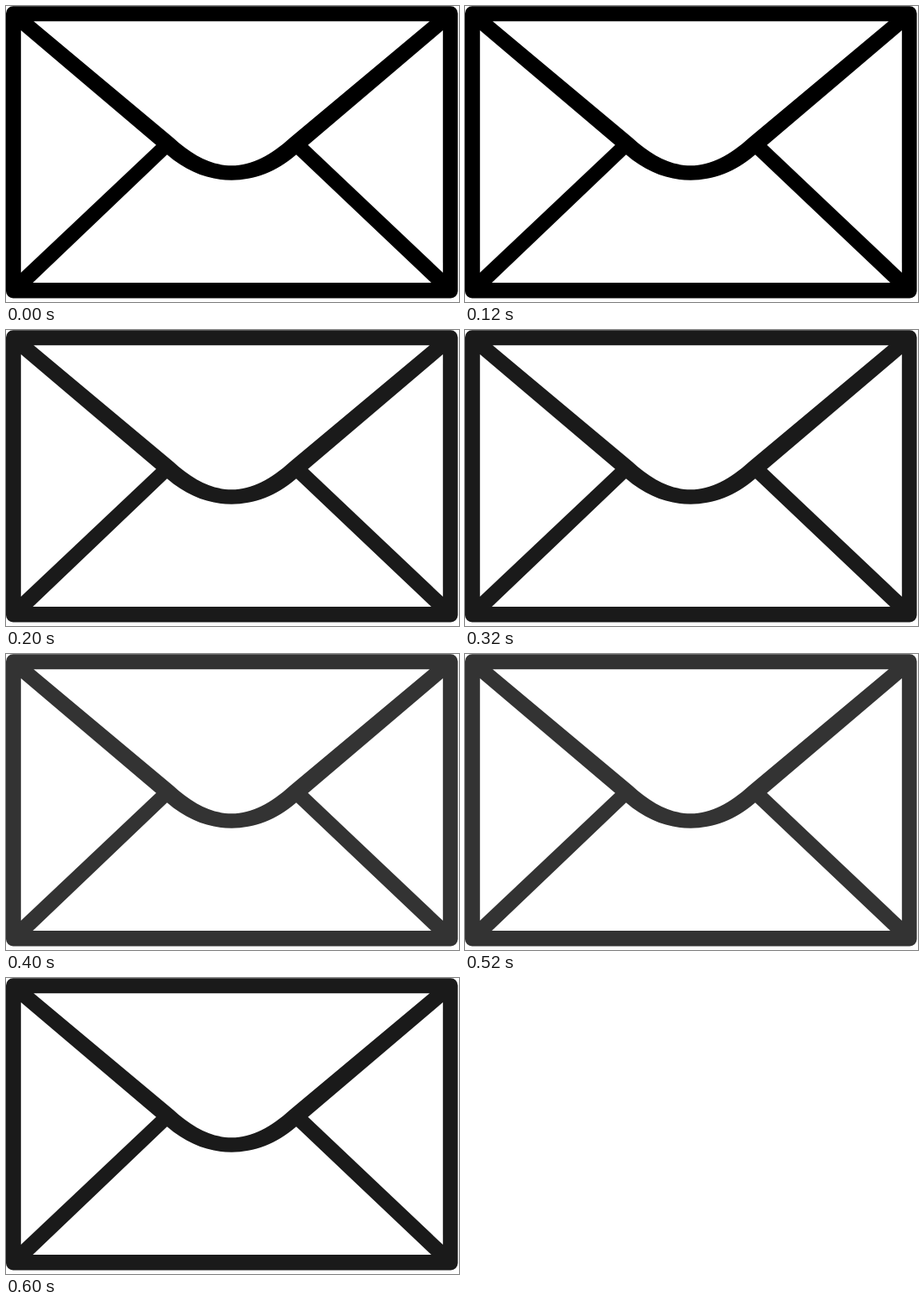
Recreate the animation shown at these times as an HTML page. Size 540 by 353 pixels, loop 0.8 s.

```html
<!DOCTYPE html>
<html lang="en">
<head>
<meta charset="utf-8">
<title>Envelope</title>
<style>
  html, body { margin: 0; width: 100%; height: 100%; overflow: hidden; background: #fff; }
  svg { display: block; width: 540px; height: 353px; }
</style>
</head>
<body>
<svg viewBox="0 0 540 353">
  <rect id="ink" x="0" y="0.3" width="538.6" height="348.2" rx="8.5"/>
  <g fill="#fff">
    <path d="M33 18.2H505L339 157C316 178 293 190.3 269 190.3S222 178 199 157Z"/>
    <path d="M17.8 29L179 165.8L17.8 318Z"/>
    <path d="M520.8 29L360 165.8L520.8 318Z"/>
    <path d="M32 330L192 177.3C216 198 242 207.7 269 207.7S322 198 346 177.3L507 330Z"/>
  </g>
</svg>
<script>
  const shades = ['#000000', '#1a1a1a', '#333333', '#1a1a1a'];
  const hold = 200;
  const frames = shades.map((fill, i) => ({
    fill, offset: i / shades.length, easing: 'steps(1, end)'
  }));
  frames.push({ fill: shades[0], offset: 1 });
  document.getElementById('ink').animate(frames, {
    duration: hold * shades.length, iterations: Infinity
  });
</script>
</body>
</html>
```
